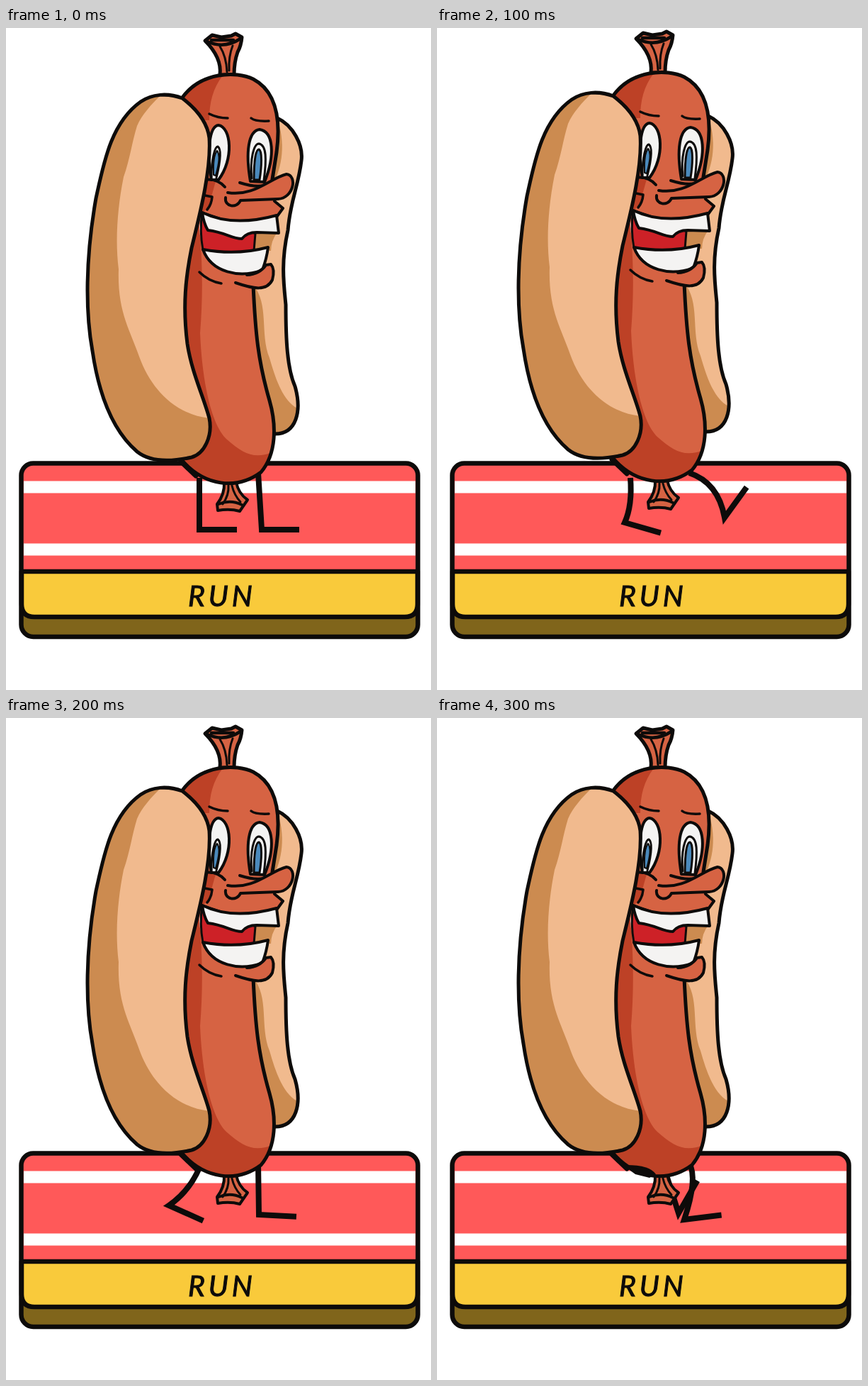
These frames come from a looping animation (600 by 933 pixels, 0.35 s). An HTML page:

```html
<!DOCTYPE html>
<html lang="en">
<head>
<meta charset="utf-8">
<title>Running hot dog</title>
<style>
  html, body { margin: 0; width: 100%; height: 100%; overflow: hidden; background: #fff; }
  svg { display: block; width: 100%; height: 100%; }
  text { font: italic 400 41px Lato, "Open Sans", sans-serif; letter-spacing: 5px; }
  path { stroke-linecap: round; stroke-linejoin: round; }
  #legs path { stroke-linecap: butt; stroke-linejoin: miter; }
</style>
</head>
<body>
<svg viewBox="0 0 600 933">
  <g id="stand"></g>
  <g id="legs"></g>
  <g id="dog"></g>
</svg>
<script>
const INK = '#0d0b0a';
const BUN = '#f1ba8e', CRUST = '#cc8b50';
const MEAT = '#d66343', SHADE = '#bd4126';
const TEETH = '#f4f3f2', BLUE = '#4b8abc';

const [stand, legBox, dog] = ['stand', 'legs', 'dog'].map(id => document.getElementById(id));

function add(parent, tag, attrs) {
  const el = document.createElementNS('http://www.w3.org/2000/svg', tag);
  for (const key in attrs) el.setAttribute(key, attrs[key]);
  return parent.appendChild(el);
}

const fill = (d, color) => add(dog, 'path', { d, fill: color });
const line = (d, width = 4) => add(dog, 'path', { d, fill: 'none', stroke: INK, 'stroke-width': width });
const shape = (d, color, width = 4) => add(dog, 'path', { d, fill: color, stroke: INK, 'stroke-width': width });

function drawStand() {
  const box = { x: 21.5, y: 613.5, width: 560, height: 244.5, rx: 17 };
  const frame = { fill: 'none', stroke: INK, 'stroke-width': 6.5 };
  add(stand, 'rect', { ...box, fill: '#80651b' });
  add(stand, 'path', { d: 'M22 766V631Q22 614 39 614H564Q581 614 581 631V766Z', fill: '#ff5959' });
  for (const y of [638.5, 726.5]) add(stand, 'rect', { x: 25, y, width: 553, height: 17, fill: '#fff' });
  add(stand, 'path', { ...frame, d: 'M22 766H581V812Q581 830 563 830H40Q22 830 22 812Z', fill: '#f9ca3b' });
  add(stand, 'rect', { ...box, ...frame });
  add(stand, 'text', { x: 257, y: 815, fill: INK, stroke: INK, 'stroke-width': 1 }).textContent = 'RUN';
}

function drawBackBun() {
  const edge = 'M383 127C405 137 420 165 417 187C413 222 401 245 398 285C388 330 392 360 395 390C395 440 397 480 408 505C418 540 410 572 380 572';
  fill(edge + 'L350 520 340 290 370 200Z', BUN);
  fill('M383 128C394 160 392 195 374 225V150Z', CRUST);
  fill('M349 362C372 390 358 430 372 465C382 500 392 525 411 536C412 560 400 572 380 572L350 520Z', CRUST);
  fill('M350 290L383 288Q374 300 374 314L345 315Z', CRUST);
  line(edge, 5);
}

function drawKnots() {
  shape('M302 66Q305 42 281 18L291 10 304 13 318 11 324 8 333 13Q332 25 327 34Q322 48 322 66Z', MEAT, 5);
  line('M284 19Q308 30 331 15M290 17H321', 4.5);
  line('M302 26Q311 40 312 62M320 25Q314 40 315 60', 3);
  shape('M308 640Q309 657 298 671L299 680Q316 677 330 681L341 665Q328 656 325 640Z', MEAT);
  line('M300 671Q317 664 333 672');
  line('M314 645Q315 658 306 671M319 645Q322 658 331 668', 3);
}

function drawSausage() {
  const head = 'M249 98C275 62 325 60 349 72C383 90 388 130 382 175L376 213';
  const base = 'C325 652 280 645 249 610';
  const side = 'C352 430 356 470 372 525C382 560 382 600 360 626' + base;
  fill(head + 'L380 243 391 254 383 265 352 290 350 313 362 340 349 362' + side + 'L255 420 275 290Z', MEAT);
  fill('M249 98C262 80 280 68 306 67C292 85 287 105 287 130H270Z', SHADE);
  fill('M284 210L296 216 286 252 276 262Z', SHADE);
  fill('M272 270C278 330 278 380 274 430C277 500 290 560 312 580C335 600 350 608 376 598L360 626' + base + 'L245 400Z', SHADE);
  line(head, 5);
  line('M349 362' + side, 5);
  line('M247 611L268 631', 7);
}

function drawEyes() {
  shape('M290 214C283 175 287 138 300 137C318 140 322 185 300 214Z', TEETH);
  line('M290 210C290 185 295 167 299 167C306 172 301 195 297 211', 3);
  shape('M293 207Q292 180 298 173Q304 180 296 208Z', BLUE, 2);
  shape('M345 216C338 175 342 145 358 143C378 146 380 180 365 217Z', TEETH);
  line('M347 212C344 185 350 163 357 163C368 165 368 185 364 215', 3);
  shape('M350 214C350 190 352 171 357 171C362 173 361 195 358 214Z', BLUE, 3);
  line('M287 121Q299 127 313 127M346 127Q352 132 371 131', 3.5);
  line('M279 214Q298 211 309 224M330 218Q358 227 372 219');
}

function drawNose() {
  const tip = 'M313 232C350 238 372 212 396 206C412 208 406 240 384 241L331 243';
  fill(tip + 'Z', MEAT);
  line(tip + 'C326 255 308 252 310 239');
  line('M281 236L291 238Q290 249 284 256', 3.5);
  line('M379 244L391 254 383 265');
}

function drawMouth() {
  shape('M277 260Q273 285 278 313Q310 321 350 314L352 290 330 278Z', '#cd2127', 3);
  shape('M277 260Q320 281 382 264L385 289 354 288Q340 288 333 297C318 297 310 288 285 285Q279 275 277 260Z', TEETH);
  shape('M278 312Q325 321 370 309Q368 325 362 341C330 353 290 345 278 312Z', TEETH);
  shape('M324 359C350 368 368 371 376 355Q380 340 374 333L367 334Q358 347 340 348', MEAT);
  line('M273 344Q286 357 304 360', 3.5);
}

function drawFrontBun() {
  const inner = 'C279 520 262 485 256 445C249 390 254 350 262 310C273 265 290 200 287 155C284 130 266 112 249 99Z';
  const edge = 'M249 99C228 91 206 93 190 104C148 134 138 190 127 240C112 325 112 400 122 455C133 530 157 573 185 597C205 613 235 611 262 605C280 600 292 575 287 550' + inner;
  fill(edge, CRUST);
  fill('M249 99Q234 94 218 95C205 108 192 122 185 138C178 160 175 185 166 210C157 255 154 300 159 340C157 400 175 425 188 463C205 510 240 545 287 550' + inner, BUN);
  line(edge, 5);
}

// A leg swings from the hip; a swung thigh bows, and the foot tilts about the ankle.
const FOOT = 53, GROUND = 707;
function legPath(hipX, hipY, swing, lift, tilt, bowX, bowY) {
  const x = hipX + swing, y = GROUND - lift;
  const slide = Math.max(0, swing) * (bowX < 0 ? 0.7 : 0);
  const startX = hipX + slide;
  const bent = Math.abs(swing) > 6 && !slide;
  const midX = (startX + x) / 2 + (bent ? Math.abs(bowX) : 0);
  const midY = (hipY + y) / 2 + (bent ? bowY : 0);
  const a = tilt * Math.PI / 180;
  return `M${startX} ${hipY}Q${midX} ${midY} ${x} ${y}l${FOOT * Math.cos(a)} ${FOOT * Math.sin(a)}`;
}
const leftLeg = pose => legPath(273, 634, ...pose, -7, 7);
const rightLeg = pose => legPath(356, 627, ...pose, 16, -18);

// Key poses: [swing, lift, tilt] for each leg.
const STEP = 50;
const rest = [0, 0, 0], plant = [1, 7, 3], back = [-43, 20, 24];
const poses = [
  [rest, [5, 0, 0]],
  [rest, [25, 3, -37]],
  [[-8, 10, 16], [50, 17, -54]],
  [back, [14, 2, -23]],
  [back, plant],
  [[45, 1, -43], plant],
  [[68, 9, -60], [-7, 0, -7]]
];
const bob = [0, -3, 4, 4];

drawStand();
drawBackBun();
drawKnots();
drawSausage();
drawEyes();
drawNose();
drawMouth();
drawFrontBun();
const smudge = fill('M262 626Q300 625 309 639L300 644 280 639Z', INK);

const legs = [leftLeg, rightLeg].map(path => ({
  path,
  el: add(legBox, 'path', { fill: 'none', stroke: INK, 'stroke-width': 8 })
}));

function draw() {
  const i = Math.floor(performance.now() / STEP) % poses.length;
  dog.setAttribute('transform', `translate(0 ${bob[i >> 1]})`);
  legs.forEach((leg, k) => leg.el.setAttribute('d', leg.path(poses[i][k])));
  smudge.setAttribute('visibility', i === poses.length - 1 ? 'visible' : 'hidden');
  requestAnimationFrame(draw);
}
draw();
</script>
</body>
</html>
```
